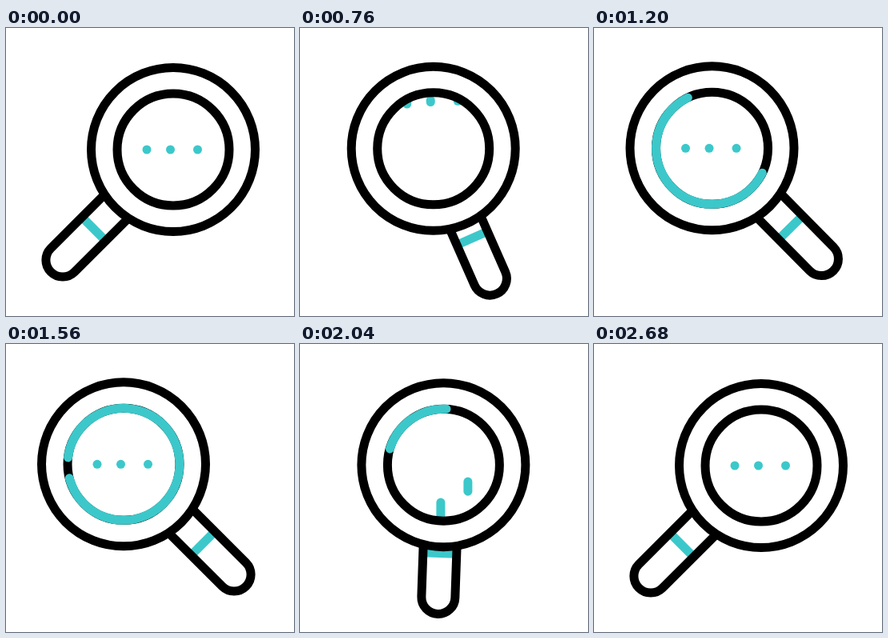
These frames come from a looping animation (360x360 px, 3 s). An HTML page:

```html
<!DOCTYPE html>
<html lang="en">
<head>
<meta charset="utf-8">
<title>Searching</title>
<style>
  html, body { margin: 0; width: 100%; height: 100%; overflow: hidden; background: #fff; }
  svg { display: block; width: 100vw; height: 100vh; }
  .ink { stroke: #000; }
  .teal { stroke: #3cc8ca; }
</style>
</head>
<body>
<svg viewBox="0 0 360 360" fill="none" stroke-width="11">
  <clipPath id="glass"><circle r="70"/></clipPath>
  <g id="handle">
    <path class="teal" d="M-21 38.5H21"/>
    <path class="ink" d="M-21 -10V93.5A21 21 0 0 0 21 93.5V-10"/>
  </g>
  <g id="lens">
    <circle class="ink" r="102.5" fill="#fff"/>
    <g id="dots" class="teal" stroke-linecap="round" clip-path="url(#glass)">
      <path/><path/><path/>
    </g>
    <circle class="ink" r="70"/>
    <path id="arc" class="teal" stroke-linecap="round"/>
  </g>
</svg>
<script>
const LOOP = 3000, STEP = 40;
const $ = id => document.getElementById(id);
const handle = $('handle'), lens = $('lens'), arc = $('arc'), dots = $('dots').children;
const mix = (a, b, p) => a + (b - a) * p;

// Cubic bezier easing with control points (x1, 0) and (x2, 1)
const bezier = (x1, x2) => x => {
  if (x <= 0) return 0;
  if (x >= 1) return 1;
  let lo = 0, hi = 1;
  for (let i = 0; i < 24; i++) {
    const s = (lo + hi) / 2, r = 1 - s;
    if (3 * r * r * s * x1 + 3 * r * s * s * x2 + s ** 3 < x) lo = s; else hi = s;
  }
  return lo * lo * (3 - 2 * lo);
};
const swing = bezier(.55, .14), soft = bezier(.66, .33);
const ramp = (ease, t, start, length) => ease((t - start) / length);

// x, hop start, hop length, drop start, drop length
const DOTS = [
  [-33, 493, 478, 1690, 930],
  [-3.5, 500, 491, 1750, 872],
  [30.5, 542, 444, 1821, 831]
];
const HOP = 60, FALL = 180;

function dotY(t, [, hop, hopLen, drop, dropLen]) {
  const h = Math.min(1, Math.max(0, (t - hop) / hopLen));
  return FALL * ramp(swing, t, drop, dropLen) - HOP * Math.sin(Math.PI * h) ** 2;
}

function drawDot(el, t, dot) {
  const y = dotY(t, dot);
  const half = Math.abs(dotY(t + 16, dot) - dotY(t - 16, dot)) / 2;
  const mid = y > FALL / 2 ? y - FALL : y;
  el.setAttribute('d', `M${dot[0]} ${mid - half}v${2 * half + .01}`);
}

function drawArc(t) {
  const turn = -60 + 360 * ramp(soft, t, 240, 2440);
  const head = ramp(soft, t, 747, 850), tail = ramp(soft, t, 1270, 1250);
  const span = Math.min(359.9, 360 * (head - tail));
  if (span < .3) return arc.setAttribute('d', '');
  const at = deg => {
    const a = deg * Math.PI / 180;
    return `${70 * Math.cos(a)} ${70 * Math.sin(a)}`;
  };
  const from = turn + 360 * tail;
  arc.setAttribute('d', `M${at(from)}A70 70 0 ${span > 180 ? 1 : 0} 1 ${at(from + span)}`);
}

function draw(t) {
  const out = ramp(swing, t, 240, 1050), back = ramp(swing, t, 1630, 1050);
  const p = out - back;
  const q = ramp(swing, t, 292, 1040) - back;
  const bow = 28 * out * (1 - out);
  handle.setAttribute('transform',
    `translate(${mix(137, 219, p)} ${mix(224, 222, p) + bow}) rotate(${mix(45, -45, p)})`);
  lens.setAttribute('transform', `translate(${mix(209, 147, q)} ${mix(152, 150.3, q)})`);
  DOTS.forEach((dot, i) => drawDot(dots[i], t, dot));
  drawArc(t);
}

const begin = performance.now();
function frame() {
  const t = (performance.now() - begin) % LOOP;
  draw(Math.floor(t / STEP) * STEP);
  requestAnimationFrame(frame);
}
frame();
</script>
</body>
</html>
```
